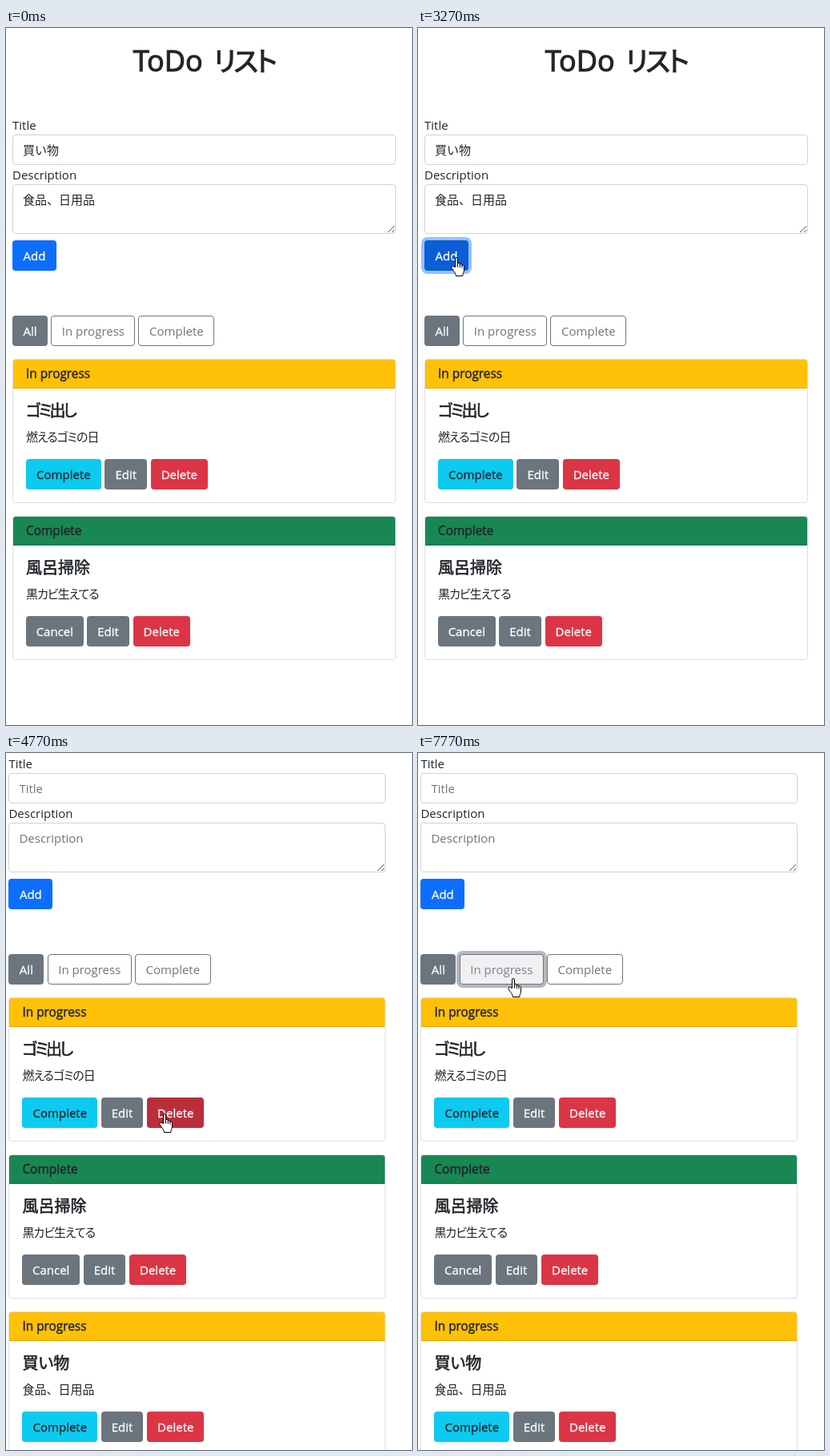
An HTML page that plays this animation: 507 px wide and 870 px high, repeating every 8000 ms.

```html
<!DOCTYPE html>
<html lang="ja">
<head>
<meta charset="utf-8">
<title>ToDo</title>
<style>
html, body { margin: 0; width: 100%; height: 100%; overflow: hidden; background: #fff; }
body { position: relative; font: 15px "Open Sans", "Noto Sans CJK JP", "Noto Sans CJK", sans-serif; color: #212529; }
div, svg { position: absolute; box-sizing: border-box; white-space: pre; }
#app { height: 1000px; }
.full { width: 100%; }
.title { text-align: center; font-size: 36px; -webkit-text-stroke: 1.1px; }
.title span { margin-left: 4px; font-size: 34px; letter-spacing: -2.5px; }
.title, .name, .kana { font-feature-settings: "palt"; }
.field { border: 1px solid #ced4da; border-radius: 4px; }
.field div { left: 12px; color: #6c757d; }
.field .value { color: #212529; }
.field svg { right: 0; bottom: 0; }
.card { border: 1px solid rgba(0,0,0,.125); border-radius: 4px; }
.head { padding-left: 16px; font-size: 15.4px; -webkit-text-stroke: .45px; border-bottom: 1px solid rgba(0,0,0,.125); border-radius: 3px 3px 0 0; }
.name { font-size: 20px; -webkit-text-stroke: .6px; }
.kana { letter-spacing: -1px; }
.name.kana { letter-spacing: -2.8px; }
.btn { border-radius: 4px; text-align: center; color: #fff; -webkit-text-stroke: .3px; }
.blue { background: #0d6efd; }
.blue.hot { background: #0b5ed7; }
.blue.ring { box-shadow: 0 0 0 4px rgba(49,132,253,.5); }
.gray { background: #6c757d; }
.cyan { background: #0dcaf0; color: #212529; }
.cyan.hot { background: #31d2f2; }
.red { background: #dc3545; }
.red.hot { background: #bb2d3b; }
.line { border: 1px solid #6c757d; color: #6c757d; -webkit-text-stroke: 0; }
.line.hot { background: #6c757d; color: #fff; }
.line.warm { background: #eff0f1; color: #7c848b; }
.line.ring { box-shadow: 0 0 0 4px rgba(108,117,125,.5); }
#arrow, #hand { overflow: visible; fill: #fff; stroke: #000; stroke-linejoin: round; }
</style>
</head>
<body>
<div id="app"></div>
<svg id="arrow" width="13" height="20"><path d="M.5.5V16.5L4.2 13l2.5 6 2.4-1-2.5-5.8H12z"/></svg>
<svg id="hand" width="18" height="24"><path d="M5.5 12.5V2a1.5 1.5 0 0 1 3 0V8.5a1.4 1.4 0 0 1 2.8.3v.8a1.4 1.4 0 0 1 2.7.3v.9a1.3 1.3 0 0 1 2.5.4V16c0 3.5-1.700 4-1.700 7.500H6.5C6.500 20 3 17.500 1 13.500c-.8-1.700 1-3 2.300-1.800zM8.500 8.500v4M11.300 9v4M14 10v3.500"/></svg>
<script>
const $ = id => document.getElementById(id), app = $('app');

function box(parent, cls, x, y, w, h, text = '') {
  const el = document.createElement('div');
  el.className = cls;
  el.textContent = text;
  Object.assign(el.style, { left: x + 'px', top: y + 'px', height: h + 'px', lineHeight: h + 'px' });
  if (w) el.style.width = w + 'px';
  parent.append(el);
  return el;
}
const btn = (parent, color, x, y, w, text) => {
  const el = box(parent, 'btn ' + color, x, y, w, 38, text);
  if (color === 'line') el.style.lineHeight = '36px';
  return el;
};

function field(y, h, hint, value) {
  const el = box(app, 'field full', 0, y, 0, h);
  const text = box(el, '', 12, 0, 0, 36);
  return filled => {
    text.textContent = filled ? value : hint;
    text.className = filled ? 'value' : '';
  };
}

function card(i, done, name, note, nameClass, noteClass) {
  const el = box(app, 'card full', 0, 413 + 196 * i, 0, 180);
  const head = box(el, 'head full', 0, 0, 0, 36, done ? 'Complete' : 'In progress');
  head.style.background = done ? '#198754' : '#ffc107';
  box(el, 'name ' + nameClass, 16, 52, 0, 24, name);
  box(el, noteClass, 16, 84, 0, 24, note);
  const w = done ? 72.3 : 94.4;
  return {
    el,
    main: btn(el, done ? 'gray' : 'cyan', 15.7, 124, w, done ? 'Cancel' : 'Complete'),
    edit: btn(el, 'gray', 19.9 + w, 124, 52.8, 'Edit'),
    del: btn(el, 'red', 77.3 + w, 124, 71.3, 'Delete')
  };
}

const title = box(app, 'title full', 0, 17, 0, 48, 'ToDo ');
title.insertAdjacentHTML('beforeend', '<span>リスト</span>');
box(app, '', 0, 109, 0, 24, 'Title');
box(app, '', 0, 171, 0, 24, 'Description');
const fields = [field(133, 38, 'Title', '買い物'), field(195, 62, 'Description', '食品、日用品')];
document.querySelectorAll('.field')[1].insertAdjacentHTML('beforeend',
  '<svg width="11" height="11" stroke="#555"><path d="M2 10l8-8M7 10l3-3"/></svg>');
const add = btn(app, 'blue', 0, 265, 55, 'Add');
btn(app, 'gray', 0, 359, 44, 'All');
const prog = btn(app, 'line', 48.4, 359, 105, 'In progress');
const comp = btn(app, 'line', 157.4, 359, 95, 'Complete');
const trash = card(0, false, 'ゴミ出し', '燃えるゴミの日', 'kana', 'kana');
card(1, true, '風呂掃除', '黒カビ生えてる', '', 'kana');
const extra = card(2, false, '買い物', '食品、日用品', '', '').el;

// time, pointer, x, y, hovered button, focused button, hover class
const steps = [
  [0],
  [500, 'arrow', 318, 557],
  [750, 'arrow', 280, 490],
  [1000, 'arrow', 236, 422],
  [1250, 'hand', 200, 364],
  [1520, 'arrow', 112, 316],
  [1780, 'hand', 46, 288, add],
  [2030, 'hand', 41, 286, add],
  [3030, 'hand', 41, 286, add, add],
  [3770, 'hand', 41, 286, add],
  [4270, 'arrow', 128, 342],
  [4520, 'arrow', 199, 411],
  [4770, 'hand', 191, 450, trash.del],
  [5020, 'arrow', 194, 471, trash.del],
  [5270, 'arrow', 240, 620],
  [5520, 'arrow', 297, 738],
  [5770, 'arrow', 214, 590],
  [6020, 'hand', 90, 442, trash.main],
  [6270, 'hand', 100, 286, prog],
  [6520, 'hand', 101, 283, prog, prog],
  [6770, 'arrow', 150, 400, null, prog],
  [7020, 'arrow', 176, 471, null, prog],
  [7270, 'hand', 196, 272, comp, prog],
  [7520, 'arrow', 150, 157, null, prog],
  [7770, 'hand', 112, 281, prog, prog, 'warm']
];
const buttons = [add, prog, comp, trash.main, trash.del];

function draw(t) {
  const [, pointer, x, y, hot, focus, tone = 'hot'] = steps.filter(s => s[0] <= t).pop();
  for (const b of buttons) {
    b.classList.remove('hot', 'warm');
    if (b === hot) b.classList.add(tone);
    b.classList.toggle('ring', b === focus);
  }
  for (const id of ['arrow', 'hand']) {
    $(id).style.display = id === pointer ? '' : 'none';
    $(id).style.left = x + 'px';
    $(id).style.top = y + 'px';
  }
  const added = t >= 3770;
  app.style.left = (added ? 3.4 : 8) + 'px';
  app.style.width = (added ? 470.6 : 479) + 'px';
  app.style.top = (t >= 4770 ? -108 : 0) + 'px';
  extra.style.display = added ? '' : 'none';
  fields.forEach(show => show(!added));
}

const start = performance.now();
function tick() {
  draw((performance.now() - start) % 8000);
  requestAnimationFrame(tick);
}
tick();
</script>
</body>
</html>
```
